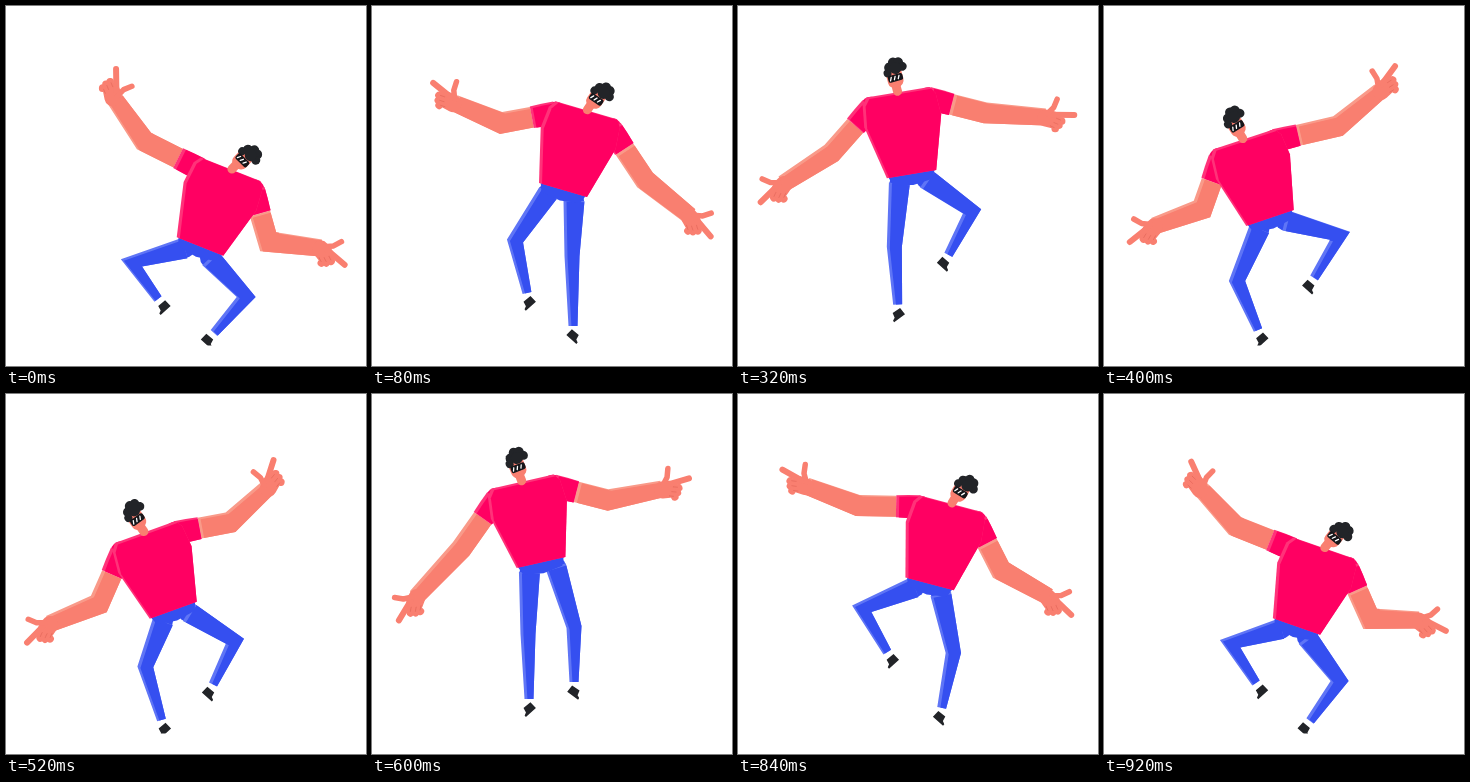
Recreate the animation shown at these times as an HTML page with a canvas. Size 360 px wide and 360 px high, loop 0.96 s.

```html
<!DOCTYPE html>
<html lang="en">
<head>
<meta charset="utf-8">
<title>Dancing man</title>
<style>
  html, body { margin: 0; width: 100%; height: 100%; overflow: hidden; background: #fff; }
  canvas { display: block; width: 360px; height: 360px; }
</style>
</head>
<body>
<canvas id="stage" width="360" height="360"></canvas>
<script>
const ctx = document.getElementById('stage').getContext('2d');
const SIZE = 360, LOOP = 960, STEP = 40, RAD = Math.PI / 180;
const SKIN = ['#f99a89', '#f97f70'];
const SHIRT = ['#ff3279', '#ff0062'];
const JEANS = ['#5f75f6', '#354ff0'];
const DARK = '#222428', CREASE = '#e56a5c';

// Body: waist x, y, tilt. Side: elbow, wrist, hand bend, knee, ankle.
// The second half of the dance mirrors the first.
const keys = [];
const flipSide = ([ex, ey, wx, wy, bend, kx, ky, ax, ay]) =>
  [SIZE - ex, ey, SIZE - wx, wy, -bend, SIZE - kx, ky, SIZE - ax, ay];

function pose(t, body, left, right) {
  const [x, y, tilt] = body;
  keys.push({ t, v: [...body, ...left, ...right] });
  keys.push({
    t: (t + LOOP / 2) % LOOP,
    v: [SIZE - x, y, -tilt, ...flipSide(right), ...flipSide(left)]
  });
}

pose(0, [194, 240.5, 21.6],
  [138, 135, 108, 92, 39, 123, 256, 152, 293], [262, 236, 315, 242, 29, 241, 291, 208, 327]);
pose(80, [191, 184, 16.3],
  [129, 117, 82, 97, 21, 143, 235, 155, 287], [273, 174, 318, 210, 6, 200, 250, 201, 320]);
pose(240, [179, 146.5, -1],
  [95, 110, 42, 138, -6, 153, 213, 156, 272], [260, 112, 312, 138, -6, 217, 205, 207, 257]);
pose(400, [166, 212, -18.4],
  [98, 203, 50, 220, -14, 133, 275, 154, 324], [234, 120, 276, 85, -19, 238, 229, 210, 272]);
pose(600, [169, 168.5, -13],
  [89, 155, 44, 203, -7, 156, 240, 157, 305], [236, 106, 290, 95, -10, 202, 233, 202, 288]);
pose(760, [182.5, 153, 4.5],
  [106, 107, 45, 128, 5, 132, 202, 151, 248], [268, 124, 318, 155, 6, 200, 225, 200, 284]);
pose(920, [192.5, 232.5, 19],
  [131, 132, 97, 95, 23, 124, 249, 152, 289], [266, 225, 315, 226, 21, 236, 287, 206, 327]);
keys.sort((a, b) => a.t - b.t);

function keyAt(i) {
  const n = keys.length, k = keys[(i + n) % n];
  return { t: k.t + Math.floor(i / n) * LOOP, v: k.v };
}

// Smooth periodic curve through the poses
function sample(t) {
  let i = keys.length - 1;
  while (keys[i].t > t) i--;
  const [a, b, c, d] = [-1, 0, 1, 2].map(o => keyAt(i + o));
  const span = c.t - b.t, u = (t - b.t) / span;
  const slope = (p, q, r, j) => {
    const h1 = q.t - p.t, h2 = r.t - q.t;
    return ((q.v[j] - p.v[j]) / h1 * h2 + (r.v[j] - q.v[j]) / h2 * h1) / (h1 + h2);
  };
  return b.v.map((from, j) => {
    const to = c.v[j], u2 = u * u, u3 = u2 * u;
    return from + (to - from) * (3 * u2 - 2 * u3) +
      span * (slope(a, b, c, j) * (u3 - 2 * u2 + u) + slope(b, c, d, j) * (u3 - u2));
  });
}

const toward = (p, q, dist) => {
  const len = Math.hypot(q[0] - p[0], q[1] - p[1]);
  return [p[0] + (q[0] - p[0]) / len * dist, p[1] + (q[1] - p[1]) / len * dist];
};

function polygon(points) {
  const path = new Path2D();
  points.forEach(([x, y]) => path.lineTo(x, y));
  path.closePath();
  return path;
}

// Fills a shape with a lighter band along its upper left edge
function shade(path, [light, base]) {
  ctx.save();
  ctx.fillStyle = light;
  ctx.fill(path);
  ctx.clip(path);
  ctx.translate(3, 1.5);
  ctx.fillStyle = base;
  ctx.fill(path);
  ctx.restore();
}

function dot(x, y, r, color) {
  ctx.fillStyle = color;
  ctx.beginPath();
  ctx.arc(x, y, r, 0, 7);
  ctx.fill();
}

function line(points, width, color) {
  ctx.strokeStyle = color;
  ctx.lineWidth = width;
  ctx.beginPath();
  points.forEach(([x, y]) => ctx.lineTo(x, y));
  ctx.stroke();
}

// Tapered limb with one bend
function limb(a, b, c, [wa, wb, wc], colors) {
  const normal = (p, q) => {
    const [x, y] = toward(p, q, 1);
    return [p[1] - y, x - p[0]];
  };
  const n1 = normal(a, b), n2 = normal(b, c);
  const sum = [n1[0] + n2[0], n1[1] + n2[1]];
  const len = Math.hypot(...sum) || 1;
  const m = [sum[0] / len, sum[1] / len];
  const miter = 1 / Math.max(0.4, m[0] * n1[0] + m[1] * n1[1]);
  const turn = n1[0] * n2[1] - n1[1] * n2[0];
  const off = (p, n, d) => [p[0] + n[0] * d, p[1] + n[1] * d];
  const edge = s => [
    off(a, n1, s * wa / 2),
    off(b, m, s * wb / 2 * (turn * s > 0 ? Math.min(miter, 2) : Math.min(miter, 1.15))),
    off(c, n2, s * wc / 2)
  ];
  shade(polygon([...edge(1), ...edge(-1).reverse()]), colors);
}

function place(x, y, angle, flip, draw) {
  ctx.save();
  ctx.translate(x, y);
  ctx.rotate(angle);
  ctx.scale(1, flip);
  draw();
  ctx.restore();
}

function hand() {
  const skin = SKIN[1];
  line([[0, -1], [7, -3]], 17, skin);
  line([[6, 2], [29, 0]], 6, skin);
  line([[2, 3], [9, 9], [13, 17]], 5.5, skin);
  [[16, -5], [13, -9], [9, -12]].forEach(([x, y]) => {
    dot(x, y, 3.8, skin);
    line([[x - 5, y + 3], [x - 1, y + 1]], 0.7, CREASE);
  });
}

function arm(joint, elbow, wrist, bend, flip) {
  const cuff = toward(joint, elbow, 24);
  limb(cuff, elbow, wrist, [21, 21, 17], SKIN);
  const angle = Math.atan2(wrist[1] - elbow[1], wrist[0] - elbow[0]) + bend * RAD;
  place(...wrist, angle, flip, hand);
  dot(...joint, 11, SHIRT[1]);
  limb(joint, toward(joint, elbow, 12), cuff, [23, 23, 22], SHIRT);
}

function leg(hip, knee, ankle, tilt, side) {
  dot(...hip, 10, JEANS[1]);
  limb(hip, knee, ankle, [21, 15, 9], JEANS);
  const reach = Math.hypot(ankle[0] - knee[0], ankle[1] - knee[1]);
  ctx.save();
  ctx.translate(...toward(knee, ankle, reach + 9.5));
  ctx.scale(side, 1);
  ctx.rotate(-tilt * RAD);
  ctx.fillStyle = DARK;
  ctx.fill(polygon([[-4, -4], [5, -4], [5.5, 4], [-8, 4.5], [-8, 2.5], [-5, 1]]));
  ctx.restore();
}

function head() {
  line([[0, -12], [0, -3]], 9, SKIN[1]);
  ctx.fillStyle = SKIN[1];
  ctx.beginPath();
  ctx.roundRect(-7, -27, 16, 20, [3, 3, 7, 6]);
  ctx.fill();
  [[-5, -23, 4], [-2, -28, 5], [3, -32, 5], [8, -31, 5], [11, -26, 4.5], [4, -26, 6]]
    .forEach(([x, y, r]) => dot(x, y, r, DARK));
  ctx.fillStyle = '#15161a';
  ctx.beginPath();
  ctx.roundRect(-6, -20, 15, 7, 2);
  ctx.fill();
  for (let x = -4; x < 8; x += 4) line([[x, -15], [x + 1.5, -18]], 1.3, '#fff');
}

function draw(t) {
  const v = sample(t);
  const [x, y, tilt] = v;
  const cos = Math.cos(tilt * RAD), sin = Math.sin(tilt * RAD);
  const at = (px, py) => [x + px * cos - py * sin, y + px * sin + py * cos];
  const sides = [-1, 1].map((side, i) => {
    const [ex, ey, wx, wy, bend, kx, ky, ax, ay] = v.slice(3 + 9 * i, 12 + 9 * i);
    return { side, elbow: [ex, ey], wrist: [wx, wy], bend, knee: [kx, ky], ankle: [ax, ay] };
  });

  ctx.fillStyle = '#fff';
  ctx.fillRect(0, 0, SIZE, SIZE);
  ctx.save();
  ctx.beginPath();
  ctx.rect(0, 0, SIZE, 339.5);
  ctx.clip();
  ctx.lineCap = ctx.lineJoin = 'round';

  sides.forEach(({ side, knee, ankle }, i) => {
    // The standing foot lies flat for a moment
    const flat = Math.max(0, Math.cos((t - 220 - i * LOOP / 2) / LOOP * 2 * Math.PI)) ** 8;
    leg(at(13.5 * side, 7), knee, ankle, 40 - 36 * flat, -side * side * -side * -1);
  });
  ctx.fillStyle = JEANS[1];
  ctx.fill(polygon([at(-24, -2), at(24, -2), at(20, 8), at(0, 11), at(-20, 8)]));

  sides.forEach(({ side, elbow, wrist, bend }) =>
    arm(at(29 * side, -72), elbow, wrist, bend, -side));
  shade(polygon([
    at(-25, 0), at(-39, -54), at(-37, -76), at(-32, -83),
    at(32, -83), at(37, -76), at(39, -54), at(25, 0)
  ]), SHIRT);

  place(...at(0, -81), (1.9 * tilt + 3) * RAD, 1, head);
  ctx.restore();
}

function tick() {
  const t = performance.now() % LOOP;
  draw(Math.floor(t / STEP) * STEP);
  requestAnimationFrame(tick);
}
tick();
</script>
</body>
</html>
```
